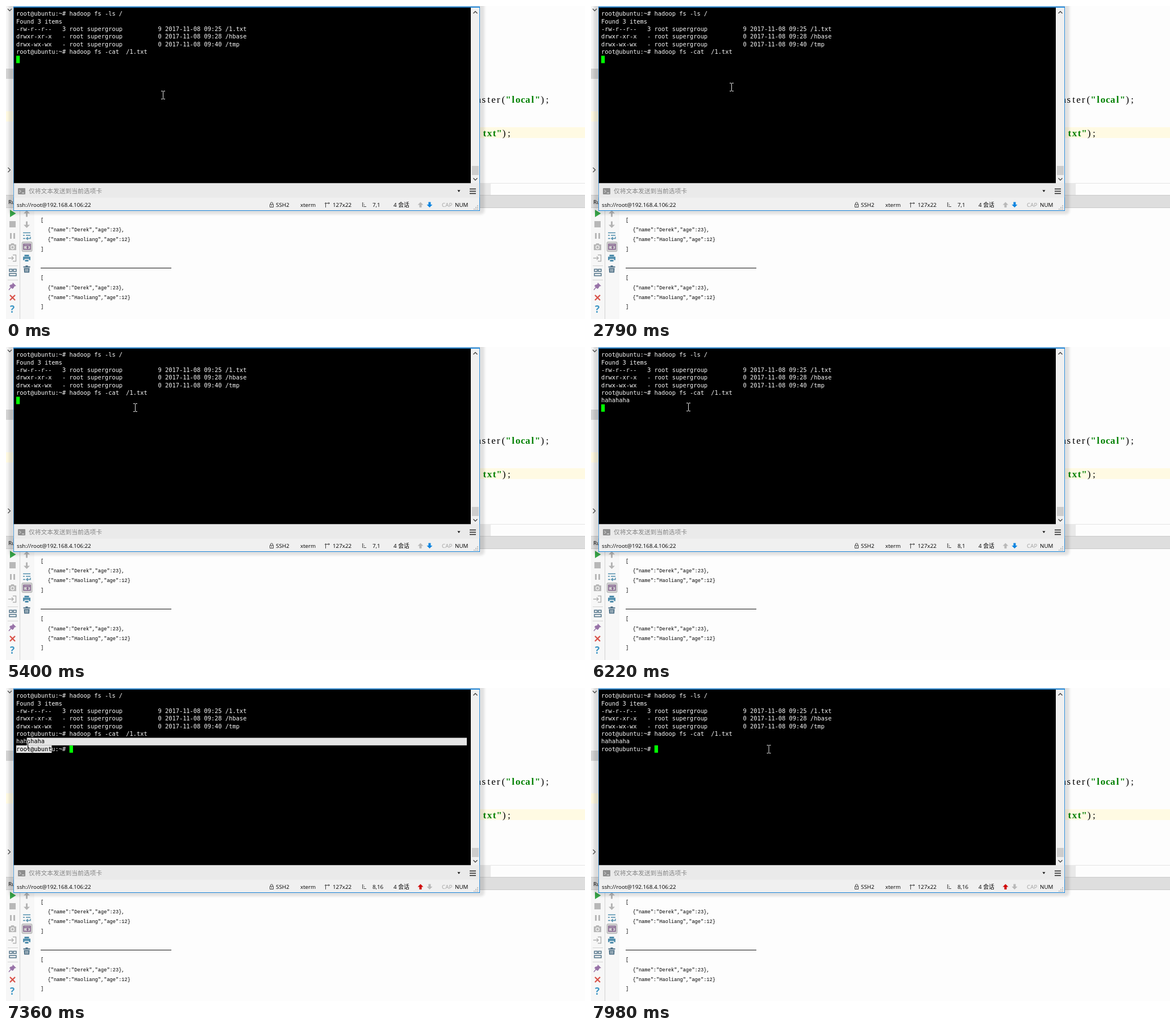
An HTML page for the animation above (8 s loop, 1019 by 550 pixels).

```html
<!DOCTYPE html>
<html lang="zh">
<head>
<meta charset="utf-8">
<title>Terminal over editor</title>
<style>
  html, body { margin: 0; width: 100%; height: 100%; overflow: hidden; background: #fdfdfd; }
  svg { display: block; isolation: isolate; }
  text { white-space: pre; }
  .term { font: 10.372px "DejaVu Sans Mono", monospace; fill: #f8f8f8; }
  .ui { font: 9.8px "Open Sans", "Noto Sans CJK SC", sans-serif; fill: #000; }
  .out { font: 8.67px "Liberation Mono", monospace; fill: #000; }
  .code { font: 17px "Liberation Serif", serif; text-anchor: middle; }
  .str { font-weight: bold; fill: #008000; }
  .line { fill: none; stroke-width: 1.4; }
  .invert { mix-blend-mode: difference; }
</style>
</head>
<body>
<svg width="1019" height="550" viewBox="0 0 1019 550">
  <defs>
    <filter id="soft" x="-10%" y="-50%" width="120%" height="200%"><feGaussianBlur stdDeviation="2"/></filter>
  </defs>

  <!-- editor -->
  <rect width="1019" height="550" fill="#fdfdfd"/>
  <rect width="13" height="332" fill="#f6f6f6"/>
  <rect y="110" width="13" height="18" fill="#d4d4d4"/>
  <rect y="185" width="13" height="18" fill="#fffae3"/>
  <rect x="834" y="213" width="185" height="19" fill="#fffae3"/>
  <path class="line" stroke="#555" d="M3 5l3.500 3.500L10 5M3.500 284l4 4l-4 4"/>
  <g id="code"></g>
  <rect x="834" y="311" width="19" height="21" fill="#e9e9e9"/>
  <path d="M853 311.500H1019" stroke="#e4e4e4"/>

  <!-- run panel -->
  <rect y="332" width="1019" height="22" fill="#dedede"/>
  <path d="M0 332.500H1019M0 354.500H1019" stroke="#cacaca"/>
  <text class="ui" x="4" y="348">Run</text>
  <rect y="355" width="50" height="195" fill="#f7f7f7"/>
  <path d="M24.500 355V550" stroke="#d2d2d2"/>
  <path d="M3 456.500H21M3 481.500H21" stroke="#d2d2d2"/>

  <g id="tools">
    <path d="M7 358l10.500 6.500L7 371z" fill="#39a84a"/>
    <path d="M6 378h11v11H6zM7 399h3v10H7zM13 399h3v10h-3z" fill="#b8b8b8"/>
    <path d="M5 419h3l1.500-2h4l1.500 2h3v10H5z" fill="#b8b8b8"/>
    <circle cx="11.500" cy="424" r="2.800" fill="#b8b8b8" stroke="#f7f7f7" stroke-width="1.200"/>
    <path class="line" stroke="#b0b0b0" d="M12 437.500h5.500v11H12M4 443h9M10 440l3 3l-3 3"/>
    <path class="line" stroke="#4f7187" d="M6 462.500h5v4H6zM13 462.500h5v4h-5zM6 470h12v4H6z"/>
    <path d="M12 486l6 6l-3 .5l-2 3.500l-2 1l-5-5l1.500-2l3.500-1z" fill="#9873a8"/>
    <path class="line" stroke="#9873a8" d="M9 494l-4 5"/>
    <path class="line" stroke="#d9534a" style="stroke-width:2.300" d="M7 508l9 9M16 508l-9 9"/>
    <text x="7" y="539" style="font:bold 17px 'Open Sans',sans-serif" fill="#3b95c4">?</text>
    <path d="M36.500 359l5.500 5.500h-4v6h-3v-6h-4zM36.500 390l5.500-5.500h-4v-6h-3v6h-4z" fill="#b4b4b4"/>
    <path class="line" stroke="#4d8cab" d="M30 398.500h13M35 403h8M30 403h3M30 408.500h4M36 408.500h7v-3M38.500 406l-2.500 2.500l2.500 2.500"/>
    <rect x="28" y="414.500" width="18" height="17" rx="2" fill="#d0d0d0" stroke="#b4b4b4"/>
    <path class="line" stroke="#805c8a" d="M31 418.500h12v9H31zM31 421h12M36 424h4M38 422v5"/>
    <path d="M32.500 437h8v3h-8zM30 440.500h13v6h-2.500v-2h-8v2H30zM33.500 446h6v3h-6z" fill="#4d8cab"/>
    <path d="M30.500 457.500h12v2h-12zM34.500 456h4v1.500h-4zM31.500 460.500h10l-.5 8h-9z" fill="#4f7187"/>
    <path d="M34.500 462v5M36.500 462v5M38.500 462v5" stroke="#f7f7f7" stroke-width=".8"/>
  </g>
  <g id="console"></g>
  <rect x="61" y="460" width="230" height="1" fill="#111"/>

  <!-- terminal window -->
  <rect x="5" y="-20" width="837" height="386" rx="6" opacity=".11" filter="url(#soft)"/>
  <rect x="13" y="1" width="821" height="359" fill="#0078d7"/>
  <rect x="13.800" y="2.700" width="819.400" height="356.400" fill="#f0f0f0"/>
  <rect x="13.800" y="2.700" width="804.200" height="308.800" fill="#000"/>
  <path class="line" stroke="#444" d="M822.500 13l3.500-3.500l3.500 3.500M822.500 302.500l3.500 3.500l3.500-3.500"/>
  <rect x="820" y="281" width="12" height="16" fill="#cdcdcd"/>
  <rect x="13.800" y="311.500" width="819.400" height="25" fill="#eaeaea"/>
  <rect x="21" y="320" width="13" height="11" rx="1" fill="#8e8e8e"/>
  <path class="line" stroke="#eee" style="stroke-width:1" d="M23.500 323l2.500 2.500l-2.500 2.500M28 328.500h4"/>
  <text x="40" y="329" style="font:10.75px 'Noto Sans CJK SC',sans-serif" fill="#858585">仅将文本发送到当前选项卡</text>
  <path d="M794.500 323.500h5l-2.500 3.500z" fill="#111"/>
  <path d="M816 321.500h11M816 325.500h11M816 329.500h11" stroke="#222" stroke-width="1.300"/>

  <!-- status bar -->
  <g class="ui">
    <text x="19" y="352.500">ssh://root@192.168.4.106:22</text>
    <text x="475" y="352.500">SSH2</text>
    <text x="518" y="352.500">xterm</text>
    <text x="575" y="352.500">127x22</text>
    <text id="pos" x="645" y="352.500">7,1</text>
    <text x="682" y="352.500">4 会话</text>
    <text x="767" y="352.500" fill="#a0a0a0">CAP</text>
    <text x="790" y="352.500">NUM</text>
  </g>
  <g fill="none" stroke="#444">
    <path d="M464.500 348.500h6v5h-6zM465.500 348v-1.500q0-1.500 2-1.500t2 1.500V348M467.500 350v2"/>
    <path d="M562.500 346v8M561 347.500l1.500-2l1.500 2M564 346.500h5M567.500 345l2 1.500l-2 1.500"/>
    <path d="M627.500 345v8M629 349.500h2M629 352.500h5M629 346.500h1"/>
  </g>
  <path id="up" d="M729.500 344.500l5 5h-3v4.500h-4v-4.500h-3z"/>
  <path id="down" d="M745.500 354l5-5h-3v-4.500h-4v4.500h-3z"/>
  <path d="M829 351h2M826 354h2M829 354h2M823 357h2M826 357h2M829 357h2" stroke="#b0b0b0" stroke-width="1.500"/>

  <!-- terminal contents -->
  <g id="rows" class="term"></g>
  <rect id="block" width="6.244" height="13" fill="#0f0"/>
  <g id="sel" class="invert" fill="#e5e5e5">
    <rect id="selTop" y="87.500" height="13.300"/>
    <rect x="18" y="100.800" width="62.440" height="13.200"/>
  </g>
  <rect id="popup" x="13.500" y="68.500" width="21" height="20" fill="#f0f0f0" stroke="#a8a8a8"/>
  <path id="mouse" class="invert" fill="none" stroke="#e6e6e6" d="M-3 -7.500H0M1 -7.500H4M.5 -7V6M-3 6.500H0M1 6.500H4"/>
</svg>

<script>
const LOOP = 8000, COL = 6.244, ROW = 13.33, LEFT = 18;
const $ = id => document.getElementById(id);

function label(parent, str, x, y, cls) {
  const el = document.createElementNS("http://www.w3.org/2000/svg", "text");
  el.setAttribute("x", x);
  el.setAttribute("y", y);
  if (cls) el.setAttribute("class", cls);
  el.textContent = str;
  parent.append(el);
  return el;
}

// Serif letters centred in fixed-width cells
function cells(str, x, y, cls) {
  [...str].forEach((c, i) => label($("code"), c, x + (i + .5) * 8.6, y, "code " + cls));
}
cells("aster(", 828, 170, "");
cells('"local"', 879.6, 170, "str");
cells(");", 939.8, 170, "");
cells('txt"', 838, 229, "str");
cells(");", 872.4, 229, "");

for (const y of [378.5, 480]) {
  label($("console"), "[", 61, y, "out");
  label($("console"), '{"name":"Derek","age":23},', 73.5, y + 17.5, "out");
  label($("console"), '{"name":"Haoliang","age":12}', 73.5, y + 34.5, "out");
  label($("console"), "]", 61, y + 51, "out");
}

const PROMPT = "root@ubuntu:~# ";
const rows = [
  PROMPT + "hadoop fs -ls /",
  "Found 3 items",
  "-rw-r--r--   3 root supergroup          9 2017-11-08 09:25 /1.txt",
  "drwxr-xr-x   - root supergroup          0 2017-11-08 09:28 /hbase",
  "drwx-wx-wx   - root supergroup          0 2017-11-08 09:40 /tmp",
  PROMPT + "hadoop fs -cat  /1.txt",
  "hahahaha",
  PROMPT
].map((s, i) => label($("rows"), s, LEFT, Math.ceil(17 + i * ROW - .1)));

// Pointer: time, x, y (no place = hidden)
const mouseSteps = [
  [0, 276, 157], [810], [960, 276, 156], [1080, 262, 151], [1200, 247, 146],
  [2790, 247, 143], [3220, 270, 146], [3340, 295, 148], [5400, 227, 107],
  [5520, 183, 84], [5660, 175, 92], [5790, 171, 98], [5940, 171, 102],
  [6070, 171, 106], [6780, 126, 103], [6900, 84, 101], [7360, 38, 101],
  [7520, 21, 102], [7830, 300, 108], [7980, 312.5, 108]
];
// Block cursor: time, column, row, status text
const blockSteps = [[0, 0, 6, "7,1"], [6220, 0, 7, "8,1"], [6780, 15, 7, "8,16"]];

const at = (steps, t) => steps.filter(s => s[0] <= t).pop();
const show = (el, on) => el.setAttribute("visibility", on ? "visible" : "hidden");

function draw(t) {
  const [, x, y] = at(mouseSteps, t);
  show($("mouse"), x !== undefined);
  if (x !== undefined) $("mouse").setAttribute("transform", `translate(${x} ${y})`);

  const [, col, row, pos] = at(blockSteps, t);
  $("block").setAttribute("x", LEFT + col * COL);
  $("block").setAttribute("y", 87.4 + (row - 6) * ROW);
  $("pos").textContent = pos;
  show(rows[6], t >= 6220);
  show(rows[7], t >= 6780);

  const from = t < 7520 ? LEFT + 3 * COL : LEFT;
  $("selTop").setAttribute("x", from);
  $("selTop").setAttribute("width", 811 - from);
  show($("sel"), t >= 7360 && t < 7980);
  show($("popup"), t >= 7670 && t < 7980);

  $("up").setAttribute("fill", t < 7050 ? "#b9b9b9" : "#d00000");
  $("down").setAttribute("fill", t < 7360 ? "#0a84e0" : "#b9b9b9");
}

const start = performance.now();
function tick() {
  draw((performance.now() - start) % LOOP);
  requestAnimationFrame(tick);
}
tick();
</script>
</body>
</html>
```
